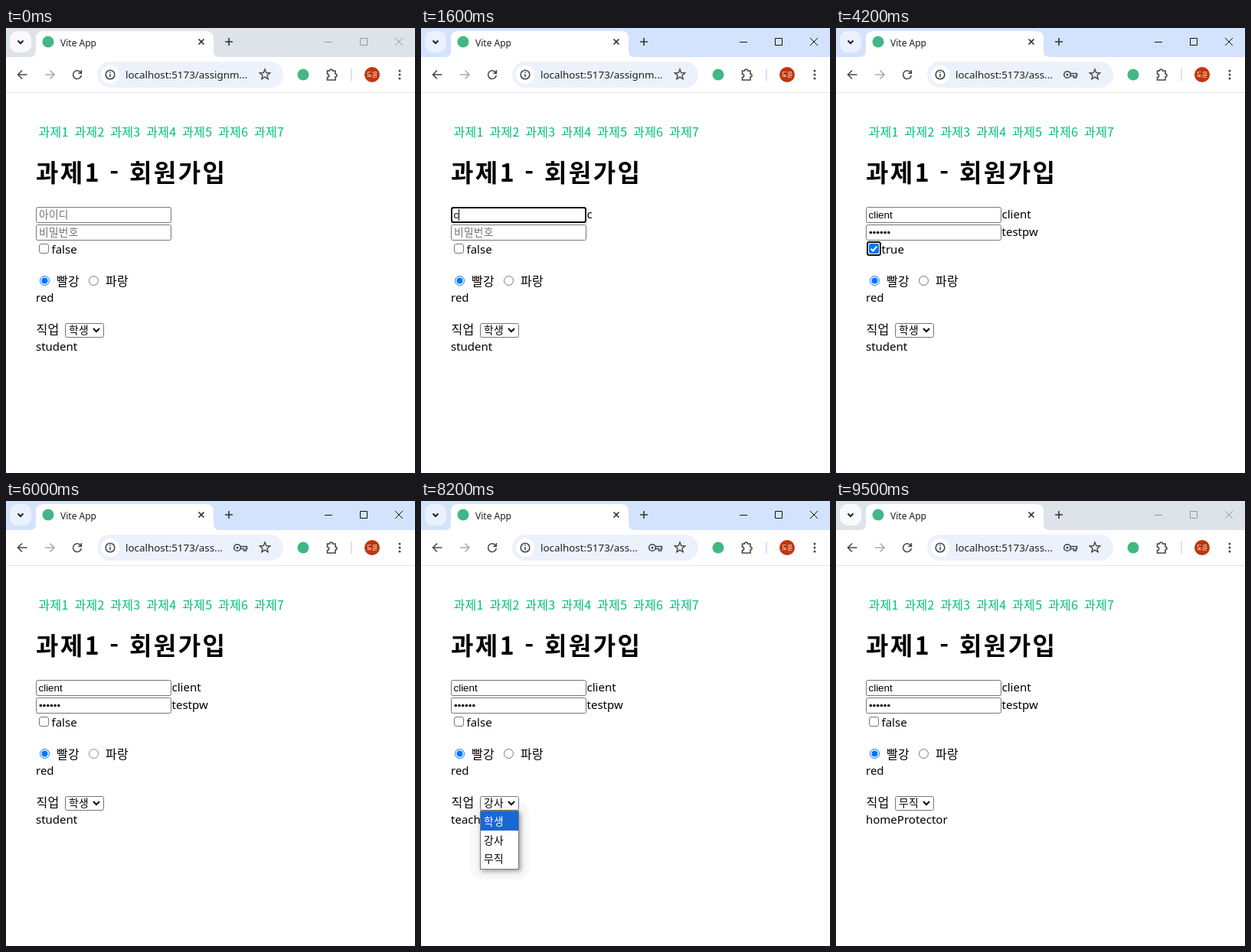
Write an HTML page that moves like this. It is 534 px wide and 582 px high and loops after 9600 ms.

```html
<!DOCTYPE html>
<html lang="ko">
<head>
<meta charset="utf-8">
<title>Vite App</title>
<style>
html, body { margin: 0; width: 100%; height: 100%; overflow: hidden; background: #fff; }
svg { display: block; width: 534px; height: 582px; }
text { font: 15px 'Noto Sans', 'Noto Sans CJK KR', sans-serif; white-space: pre; }
.ko { font: 16px 'Noto Sans CJK KR', sans-serif; letter-spacing: .3px; }
.ko.small { font-size: 13.8px; letter-spacing: .2px; }
.hint { fill: #757575; }
.typed { font: 13.33px 'Liberation Sans', Arial, sans-serif; }
.nav { fill: #00bd7e; }
.title { font: bold 32px 'Noto Sans CJK KR', sans-serif; letter-spacing: 2.4px; }
.line { fill: none; stroke: #474747; stroke-width: 1.6; }
.win { fill: none; stroke: #111; }
.strip { fill: #d3e3fd; }
.search { fill: #ebf2fe; }
.idle .win { stroke: #959799; }
.idle .strip { fill: #dee3ea; }
.idle .search { fill: #f9fafc; }
.field { fill: #fff; stroke: #767676; }
.ring { fill: none; stroke: #101010; stroke-width: 2; }
.popup { filter: drop-shadow(2px 2px 3px rgba(0, 0, 0, .4)); }
</style>
</head>
<body>
<svg id="stage" viewBox="0 0 534 582">
  <rect class="strip" width="534" height="38"/>
  <rect class="search" x="5" y="4" width="28" height="28" rx="10"/>
  <path class="line" d="M15.5 16.5l3.5 3.5 3.5-3.5" style="stroke:#1f1f1f;stroke-width:2"/>
  <path fill="#fff" d="M31 38q8 0 8-8V14q0-10 10-10H261q10 0 10 10V30q0 8 8 8z"/>
  <circle cx="55" cy="18" r="7.5" fill="#41b883"/>
  <text x="71" y="23.5" style="font-size:12px" fill="#1f1f1f">Vite App</text>
  <path class="line" d="M251.5 14.5l7 7m0-7l-7 7M286 18h10m-5-5v10" style="stroke:#333"/>
  <path class="win" d="M416 18.5h10M462.5 13.5h9v9h-9zM508 13l10 10m0-10l-10 10"/>

  <rect y="38" width="534" height="46" fill="#fff"/>
  <rect y="84" width="534" height="1" fill="#e1e4e8"/>
  <path class="line" d="M27.5 61H15.5m5.5-5.5L15.5 61l5.5 5.5"/>
  <path class="line" d="M51 61h12m-5.5-5.5L63 61l-5.5 5.5" style="stroke:#aaa"/>
  <path class="line" d="M97.6 58.3A5.4 5.4 0 1 0 98.3 62M98.4 55v4.2h-4.2"/>
  <rect x="119" y="44" width="243" height="34" rx="17" fill="#ecf2fb"/>
  <circle cx="136" cy="61" r="12" fill="#fff"/>
  <circle class="line" cx="136" cy="61" r="5.8"/>
  <path class="line" d="M136 60v4.3m0-7.2v1.5"/>
  <path class="line" style="stroke-width:1.4" d="M338 54l1.8 4.5 4.9.3-3.7 3.2 1.1 4.7-4.1-2.6-4.1 2.6 1.1-4.7-3.7-3.2 4.9-.3z"/>
  <circle cx="388" cy="61" r="7.5" fill="#41b883"/>
  <path class="line" d="M419.5 56h3a2 2 0 0 1 4 0h3.5v4a2 2 0 0 1 0 4v4h-10.5v-3.5a2.2 2.2 0 0 0 0-4.4z"/>
  <rect x="450" y="53" width="2" height="16" fill="#d3e3fd"/>
  <circle cx="478" cy="61" r="10" fill="#bf360c"/>
  <text class="ko" x="478" y="64" text-anchor="middle" fill="#fff" style="font-size:8px;letter-spacing:0">도윤</text>
  <g fill="#474747"><circle cx="514" cy="56" r="1.5"/><circle cx="514" cy="61" r="1.5"/><circle cx="514" cy="66" r="1.5"/></g>

  <g id="nav"></g>
  <text class="title" x="39" y="201">과제1 - 회원가입</text>
  <g id="live"></g>
</svg>
<script>
const LOOP = 9600;
const ID = 'client', PW = 'testpw';
const JOBS = [['학생', 'student'], ['강사', 'teacher'], ['무직', 'homeProtector']];
const BLUE = { rest: '#0075ff', hover: '#005cc8', press: '#378fff' };
const GREY = { rest: '#767676', hover: '#4f4f4f', press: '#8d8d8d' };

// Each step: time in ms, then what changes.
const steps = [
  [0, { idle: true, focus: '', caret: false, id: 0, pw: 0, key: false, checked: false,
        box: 'rest', color: 'red', red: 'rest', blue: 'rest', job: 0, open: -1 }],
  [500, { idle: false }],
  [600, { focus: 'id', caret: true }],
  [1100, { caret: false }],
  [1300, { caret: true }],
  [1600, { id: 1 }],
  [1700, { id: 2 }],
  [1900, { id: 3 }],
  [2000, { id: 4 }],
  [2400, { id: 6 }],
  [2800, { focus: 'pw' }],
  [3100, { pw: 1, key: true }],
  [3200, { pw: 2 }],
  [3300, { pw: 4 }],
  [3400, { pw: 5 }],
  [3500, { pw: 6 }],
  [3800, { focus: 'check' }],
  [4100, { box: 'press' }],
  [4200, { box: 'rest', checked: true }],
  [4700, { box: 'press' }],
  [4900, { box: 'rest', checked: false }],
  [5500, { red: 'hover' }],
  [5900, { red: 'rest', blue: 'hover' }],
  [6000, { focus: '', blue: 'press' }],
  [6100, { blue: 'hover', color: 'blue' }],
  [6500, { blue: 'rest' }],
  [6600, { red: 'hover' }],
  [6700, { red: 'press' }],
  [6800, { red: 'hover', color: 'red' }],
  [7000, { red: 'rest' }],
  [7300, { open: 0 }],
  [7600, { open: 1 }],
  [7800, { open: -1, job: 1 }],
  [8200, { open: 0 }],
  [8300, { open: 1 }],
  [8400, { open: 2 }],
  [8600, { open: -1, job: 2 }],
  [9500, { idle: true }]
];

const $ = id => document.getElementById(id);
const text = (x, y, str, cls = '', fill = '#000') =>
  `<text x="${x}" y="${y}" class="${cls}"${cls.match(/nav|hint/) ? '' : ` fill="${fill}"`}>${str}</text>`;
const rect = (x, y, w, h, rx, attrs) =>
  `<rect x="${x}" y="${y}" width="${w}" height="${h}" rx="${rx}" ${attrs}/>`;
const circle = (x, y, r, attrs) => `<circle cx="${x}" cy="${y}" r="${r}" ${attrs}/>`;

function input(y, hint, value, count, secret, focused, caret) {
  const typed = value.slice(0, count);
  let out = rect(39.5, y + .5, 176, 20, 2, 'class="field"');
  if (focused) out += rect(40, y + 1, 175, 19, 2.5, 'class="ring"');
  if (!count) out += text(43, y + 14.5, hint, 'ko small hint');
  else if (!secret) out += text(42.5, y + 15, typed, 'typed');
  else for (let i = 0; i < count; i++) out += circle(45.3 + i * 4.7, y + 10.5, 1.8, '');
  if (focused && caret) {
    const end = secret ? 43 + count * 4.7 : 42.5 + measure(typed);
    out += rect(Math.round(end), y + 3, 1, 15, 0, '');
  }
  return out + text(216.5, y + 15, typed);
}

const pen = document.createElement('canvas').getContext('2d');
function measure(str) {
  pen.font = "13.33px 'Liberation Sans', Arial, sans-serif";
  return pen.measureText(str).width;
}

function checkbox(s) {
  let out = s.checked
    ? rect(43, 282, 13, 13, 2.5, `fill="${BLUE[s.box]}"`) +
      '<path d="M45.7 288.7l2.6 2.7 5-5.8" fill="none" stroke="#fff" stroke-width="2"/>'
    : rect(43.5, 282.5, 12, 12, 2.5, `fill="#fff" stroke="${GREY[s.box]}"`);
  if (s.focus === 'check') out += rect(41, 280, 17, 17, 2.5, 'class="ring"');
  return out + text(59.5, 295, s.checked);
}

function radio(x, on, mood) {
  const tone = (on ? BLUE : GREY)[mood];
  return circle(x, 330.5, 6, `fill="#fff" stroke="${tone}"`) +
    (on ? circle(x, 330.5, 4, `fill="${tone}"`) : '');
}

function select(s) {
  return rect(77.5, 386.5, 50, 18, 2, 'class="field"') +
    text(82, 400, JOBS[s.job][0], 'ko small') +
    '<path d="M114 393l4 4 4-4" fill="none" stroke="#000" stroke-width="2"/>';
}

function popup(pick) {
  return rect(77.5, 405.5, 50, 76, 0, 'class="field popup"') +
    rect(78, 406 + pick * 25, 49, 25, 0, 'fill="#1967d2"') +
    JOBS.map(([name], i) =>
      text(82, 424 + i * 24.7, name, 'ko small', i === pick ? '#fff' : '#000')).join('');
}

function address(key) {
  const icon = key
    ? circle(302, 61, 4.3, 'class="line"') + circle(302, 61, 1.5, 'fill="#474747"') +
      '<path class="line" d="M306 59.5h8.5v3h-1v2.5h-3v-2.5h-4.5"/>'
    : '';
  return `<text x="156" y="66" fill="#1f1f1f" style="font-size:13.4px">localhost:5173/${key ? 'ass' : 'assignm'}...</text>` + icon;
}

function draw(s) {
  $('stage').setAttribute('class', s.idle ? 'idle' : '');
  const isOpen = s.open >= 0;
  $('live').innerHTML =
    address(s.key) +
    (isOpen ? rect(64, 393, 77, 102, 15, 'fill="#f8f8f8"') : '') +
    input(234, '아이디', ID, s.id, false, s.focus === 'id', s.caret) +
    input(257, '비밀번호', PW, s.pw, true, s.focus === 'pw', s.caret) +
    checkbox(s) +
    radio(50.5, s.color === 'red', s.red) + text(66, 337, '빨강', 'ko') +
    radio(114.5, s.color === 'blue', s.blue) + text(130, 337, '파랑', 'ko') +
    text(39, 358, s.color) +
    text(39.5, 400, '직업', 'ko') + select(s) +
    text(39, 422, JOBS[s.job][1]) +
    (isOpen ? popup(s.open) : '');
}

$('nav').innerHTML = Array.from({ length: 7 }, (_, i) =>
  text(42.5 + i * 46.9, 142, '과제' + (i + 1), 'ko nav')).join('');

let shown = -1;
const start = performance.now();
function tick() {
  const t = (performance.now() - start) % LOOP;
  const now = steps.filter(([at]) => at <= t).length;
  if (now !== shown) {
    shown = now;
    draw(Object.assign({}, ...steps.slice(0, now).map(step => step[1])));
  }
  requestAnimationFrame(tick);
}
tick();
</script>
</body>
</html>
```
